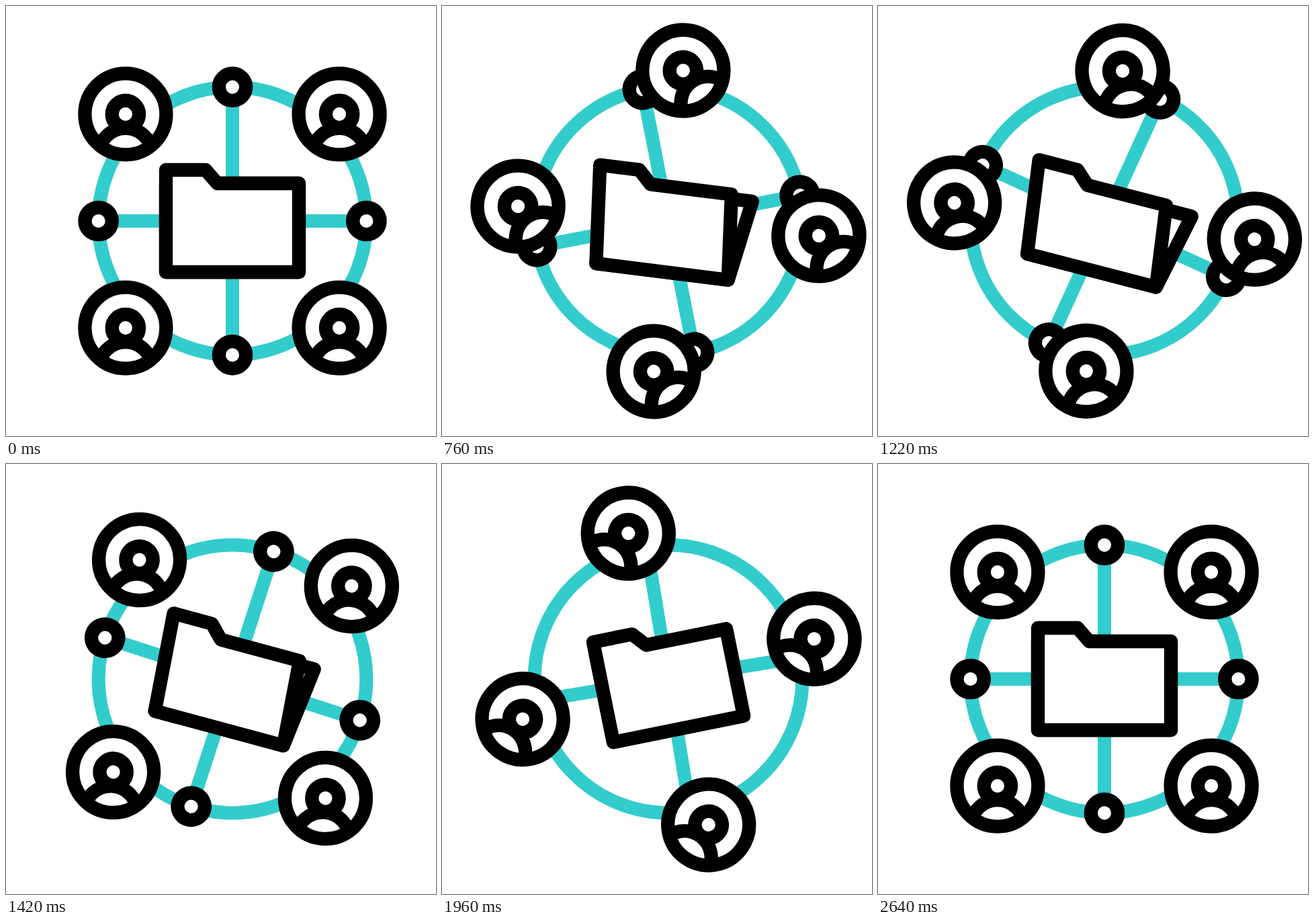
An HTML page for the animation above (3000 ms loop, 640 by 640 pixels).

```html
<!DOCTYPE html>
<html lang="en">
<head>
<meta charset="utf-8">
<title>Shared folder network</title>
<style>
html, body { margin: 0; width: 100%; height: 100%; overflow: hidden; background: #fff; }
svg { display: block; width: 100vw; height: 100vh; }
.ink { fill: #fff; stroke: #000; stroke-width: 20.3; stroke-linejoin: round; }
.ring { fill: none; stroke: #000; stroke-width: 20.3; }
.net { fill: none; stroke: #33cccc; stroke-width: 20; }
</style>
</head>
<body>
<svg viewBox="0 0 640 640">
  <defs>
    <clipPath id="disc"><circle r="60"/></clipPath>
    <g id="node"><circle class="ink" r="20.2"/></g>
    <g id="user">
      <circle r="60" fill="#fff"/>
      <g clip-path="url(#disc)"><circle class="ink" cy="61" r="40"/></g>
      <circle class="ink" r="20.2"/>
      <circle class="ring" r="60.5"/>
    </g>
  </defs>
  <g transform="translate(337 320)">
    <circle class="net" r="199.4"/>
    <g id="cross">
      <path class="net" d="M0-199V199M-199 0H199"/>
      <use href="#node" y="-199.4"/>
      <use href="#node" x="199.4"/>
      <use href="#node" y="199.4"/>
      <use href="#node" x="-199.4"/>
    </g>
    <g id="folder">
      <path id="back" class="ink"/>
      <path id="front" class="ink"/>
    </g>
    <g id="users">
      <use href="#user"/><use href="#user"/><use href="#user"/><use href="#user"/>
    </g>
  </g>
</svg>
<script>
const LOOP = 3000, START = 200, ORBIT = 225, BASE = 76;
const $ = id => document.getElementById(id);
const users = [...$('users').children];

// [time after START, value] keys, eased between neighbours
const tracks = {
  orbit: [[0, 0], [2380, 360]],
  tilt: [[0, 0], [372, -40], [1972, 40], [2440, 0]],
  cross: [[0, 0], [550, -11.1], [962, 25], [1870, -10.8], [2440, 0]],
  folder: [[0, 0], [1165, 15.1], [1255, 15.1], [1900, -15], [2440, 0]],
  open: [[0, 0], [930, 1], [1575, 0]],
  lean: [[0, 0], [800, 27], [910, 27], [1570, 0]]
};
const backShape = [[-99, -56], [99, -56], [99, BASE], [-99, BASE]];
const frontShape = [[-99, -76], [-40, -76], [-22.5, -56], [99, -56], [99, BASE], [-99, BASE]];

const smooth = x => x * x * (3 - 2 * x);

function value(keys, t) {
  if (t <= keys[0][0]) return keys[0][1];
  for (let i = 1; i < keys.length; i++) {
    const [t0, a] = keys[i - 1], [t1, b] = keys[i];
    if (t < t1) return a + (b - a) * smooth((t - t0) / (t1 - t0));
  }
  return keys[keys.length - 1][1];
}

// Lean a panel sideways and flatten it, keeping its bottom edge in place
function panel(points, shift, height, squash) {
  return 'M' + points.map(([x, y]) => {
    const up = BASE - y;
    return (x + shift * up / height).toFixed(2) + ' ' + (BASE - up * squash).toFixed(2);
  }).join('L') + 'Z';
}

function draw(time) {
  const t = time % LOOP - START;
  const v = {};
  for (const k in tracks) v[k] = value(tracks[k], t);

  $('cross').setAttribute('transform', `rotate(${v.cross})`);
  $('folder').setAttribute('transform', `rotate(${v.folder})`);
  $('back').setAttribute('d', panel(backShape, v.lean, 132, 1 - 0.135 * v.open));
  $('front').setAttribute('d', panel(frontShape, -19 * v.open, 152, 1 - 0.09 * v.open * v.open));

  users.forEach((user, i) => {
    const a = (v.orbit + 45 + 90 * i) * Math.PI / 180;
    const x = ORBIT * Math.cos(a), y = ORBIT * Math.sin(a);
    user.setAttribute('transform', `translate(${x} ${y}) rotate(${v.tilt})`);
  });
}

const begin = performance.now();
function tick() {
  draw(performance.now() - begin);
  requestAnimationFrame(tick);
}
tick();
</script>
</body>
</html>
```
